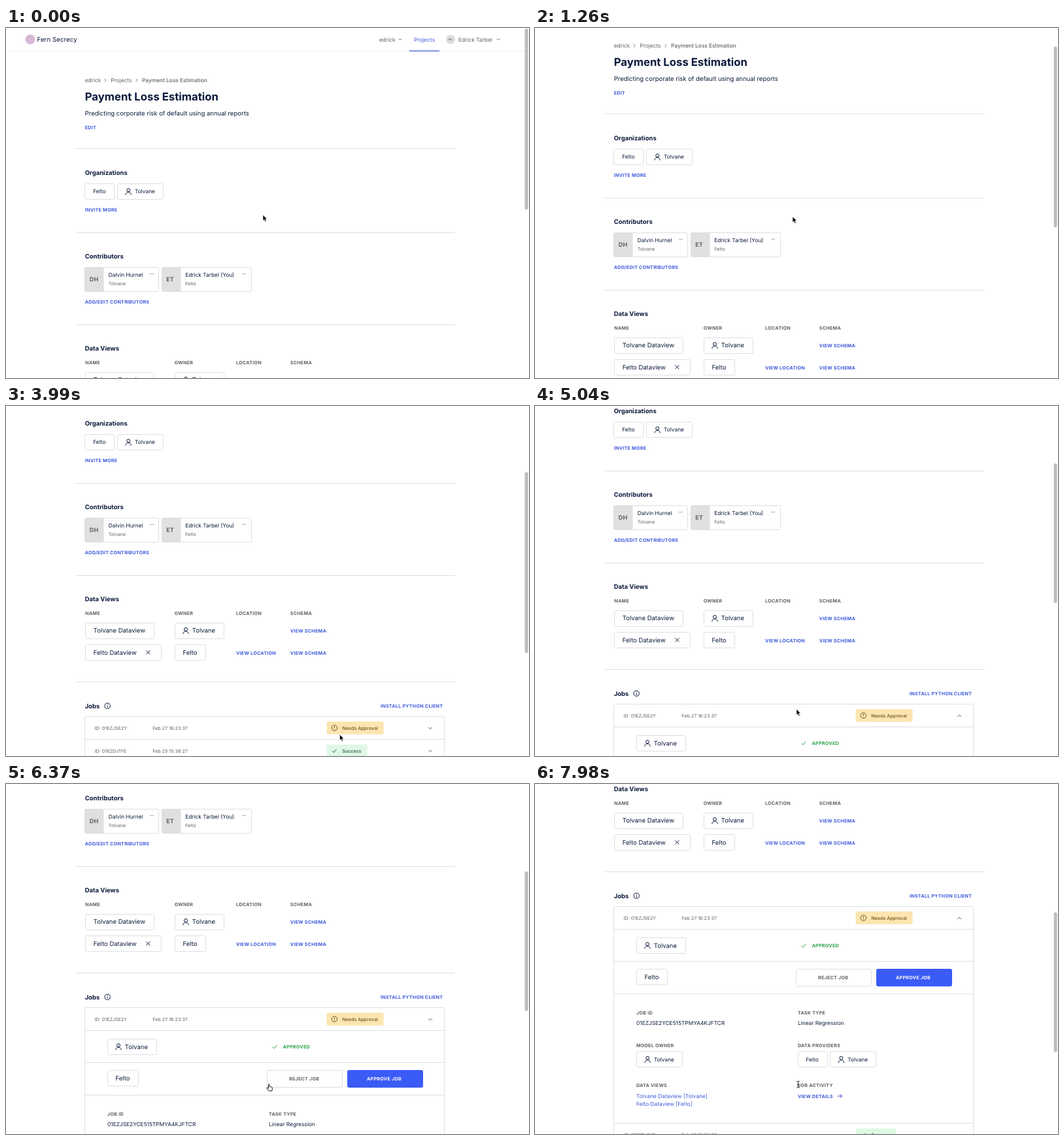
Write an HTML page that moves like this. It is 800 px wide and 536 px high and loops after 8 s.

```html
<!DOCTYPE html>
<html lang="en">
<head>
<meta charset="utf-8">
<title>Project page</title>
<style>
  html, body { margin: 0; width: 100%; height: 100%; overflow: hidden; background: #fff; }
  svg { display: block; width: 800px; height: 536px; font-family: Inter, sans-serif; text-rendering: geometricPrecision; }
</style>
</head>
<body>
<svg id="stage" viewBox="0 0 800 536"></svg>
<script>
const NAVY = '#0b1a3c', GRAY = '#5d6168', BLUE = '#3f5bdc', BUTTON = '#3b5bf6',
      GREEN = '#2aa24a', LINE = '#dedfe3', AMBER = '#6f551c';
const SMALL = 7.15, BODY = 8.35, LARGE = 9.5;
const ORG_A = 'Felto', ORG_B = 'Tolvane';

// ---- drawing helpers; y is the optical middle of a line of text ----
const text = (x, y, str, size = BODY, fill = NAVY, weight = 400, spacing = 0) =>
  `<text x="${x}" y="${y + size * 0.36}" font-size="${size}" fill="${fill}" font-weight="${weight}" letter-spacing="${spacing}">${str}</text>`;
const caps = (x, y, str, fill = BLUE) => text(x, y, str, SMALL, fill, 700, 0.26);
const heading = (y, str) => text(120.7, y, str, LARGE, NAVY, 700);
// Outlines sit on pixel centres so that they stay one pixel wide.
const snap = v => Math.floor(v) + 0.5;
const rect = (x, y, w, h, fill = '#fff', stroke = LINE, r = 2) =>
  `<rect x="${snap(x)}" y="${snap(y)}" width="${Math.round(w)}" height="${Math.round(h)}" rx="${r}" fill="${fill}" stroke="${stroke}"/>`;
const stroke = (d, color = NAVY, width = 1) =>
  `<path d="${d}" fill="none" stroke="${color}" stroke-width="${width}" stroke-linecap="round" stroke-linejoin="round"/>`;
const rule = (x1, x2, y, color = LINE) => `<path d="M${x1} ${snap(y)}H${x2}" stroke="${color}"/>`;
const circle = (x, y, r, fill, line = 'none') =>
  `<circle cx="${x}" cy="${y}" r="${r}" fill="${fill}" stroke="${line}"/>`;
const chevron = (x, y, dir, size = 2.5) =>
  stroke(`M${x - size} ${y - dir * size / 2}l${size} ${dir * size}l${size} ${-dir * size}`, GRAY);
const crumbArrow = x => stroke(`M${x - 1} 78l2 2.2l-2 2.2`, GRAY, 0.8);
const check = (x, y, color) => stroke(`M${x - 3} ${y}l2 2.2l4 -4.6`, color);
const person = (x, y) =>
  circle(x, y - 2, 2.5, 'none', NAVY) + stroke(`M${x - 4.2} ${y + 4.8}c.3-5.2 8.1-5.2 8.4 0`);

function pill(x, y, w, label, size, withPerson) {
  return rect(x, y - 12, w, 24) + (withPerson ? person(x + 17, y) : '') +
    text(x + (withPerson ? 26.8 : 12.5), y, label, size);
}
function card(x, w, initials, name, org) {
  return rect(x, 366, w, 37) + `<path d="M${Math.floor(x) + 1} 367h28.5v36h-28.5z" fill="#e0e0e0"/>` +
    text(x + 7, 385, initials, 9, GRAY, 700, 0.2) + text(x + 36, 378, name) +
    text(x + 36, 391, org, SMALL, GRAY) +
    [-2, 0, 2].map(d => circle(x + w - 10.5 + d, 376.3, 0.6, GRAY)).join('');
}
function jobRow(y, id, date) {
  return text(135.7, y, 'ID: ' + id, SMALL, GRAY) + text(224.3, y, date, SMALL, GRAY);
}
function badge(y, w, label, fill, color) {
  return `<rect x="490.5" y="${y - 10}" width="${w}" height="19.5" rx="2" fill="${fill}"/>` +
    text(514.2, y, label, SMALL, color, 450);
}

// ---- page ----
const header =
  circle(37, 17.5, 7.5, '#d9b9d8') + text(47.5, 17.5, 'Fern Secrecy', 9.8, NAVY) +
  text(571, 17.5, 'edrick', BODY, GRAY) + chevron(603, 17.5, 1, 1.8) +
  text(624, 17.5, 'Projects', BODY, BLUE) +
  circle(680, 17.5, 7, '#dcdcdc') + text(677.2, 17.5, 'ET', 4, GRAY, 700) +
  text(692, 17.5, 'Edrick Tarbel', BODY, GRAY) + chevron(753, 17.5, 1, 1.8) +
  rule(0, 793, 35, '#eeeef0') + `<path d="M617 34.5h46v1.3h-46z" fill="${BLUE}"/>`;

const intro =
  text(120.7, 80, 'edrick', BODY, GRAY) + crumbArrow(152) +
  text(160.3, 80, 'Projects', BODY, GRAY) + crumbArrow(200) +
  text(208, 80, 'Payment Loss Estimation', BODY, GRAY, 500) +
  text(120.7, 104.7, 'Payment Loss Estimation', 16.7, NAVY, 700) +
  text(120.7, 131, 'Predicting corporate risk of default using annual reports', LARGE) +
  caps(120.7, 152, 'EDIT');

const people =
  heading(221.5, 'Organizations') + pill(120.7, 250.3, 45, ORG_A, BODY) +
  pill(170.2, 250.3, 70.3, ORG_B, BODY, true) + caps(120.7, 278.4, 'INVITE MORE') +
  heading(349.7, 'Contributors') +
  card(120.7, 112.8, 'DH', 'Dalvin Hurnel', ORG_B) +
  card(238.2, 136.6, 'ET', 'Edrick Tarbel (You)', ORG_A) +
  caps(120.7, 419.5, 'ADD/EDIT CONTRIBUTORS');

const dataViews =
  heading(490.7, 'Data Views') +
  [[121.2, 'NAME'], [257.7, 'OWNER'], [352, 'LOCATION'], [434.8, 'SCHEMA']]
    .map(([x, s]) => caps(x, 512.4, s, GRAY)).join('') +
  pill(121.3, 539, 104.5, ORG_B + ' Dataview', LARGE) + pill(258, 539, 74.7, ORG_B, LARGE, true) +
  caps(434.8, 539.7, 'VIEW SCHEMA') +
  pill(121.3, 572.4, 116.3, ORG_A + ' Dataview', LARGE) +
  stroke('M214.8 569.6l5.4 5.4m0-5.4l-5.4 5.4') + pill(258, 572.4, 46.7, ORG_A, LARGE) +
  caps(352, 573.2, 'VIEW LOCATION') + caps(434.8, 573.2, 'VIEW SCHEMA');

const jobs =
  heading(654.4, 'Jobs') + circle(155.2, 654.2, 4.1, 'none', NAVY) +
  stroke('M155.2 654v2.2m0-4.2v.1') + caps(573, 654.2, 'INSTALL PYTHON CLIENT') +
  rect(120.9, 670.9, 550.3, 520) + jobRow(688.5, '01EZJSE2Y', 'Feb 27 16:23:37') +
  badge(688.3, 87, 'Needs Approval', '#fce5b0', AMBER) +
  circle(502.4, 688, 4.2, 'none', AMBER) + stroke('M502.4 686v2m0 2v.1', AMBER) +
  rule(121, 671, 705.8);

const details =
  pill(155, 730.2, 74.7, ORG_B, LARGE, true) + check(411, 730.7, GREEN) +
  caps(423.5, 730.7, 'APPROVED', GREEN) + rule(121, 671, 754.2) +
  pill(155, 778.6, 46.7, ORG_A, LARGE) +
  rect(399.7, 766.7, 115.2, 25.8) + caps(433, 779.5, 'REJECT JOB', GRAY) +
  rect(522.3, 766.7, 114.5, 25.8, BUTTON, BUTTON) + caps(552, 779.5, 'APPROVE JOB', '#fff') +
  rule(121, 671, 804.4) +
  caps(155, 833.3, 'JOB ID', GRAY) + text(155, 849.2, '01EZJSE2YCE515TPMYA4KJFTCR') +
  caps(402, 833.3, 'TASK TYPE', GRAY) + text(402, 849.2, 'Linear Regression') +
  caps(155, 883.2, 'MODEL OWNER', GRAY) + pill(155.2, 904.7, 69.5, ORG_B, BODY, true) +
  caps(402, 883.2, 'DATA PROVIDERS', GRAY) + pill(402, 904.7, 45, ORG_A, BODY) +
  pill(451.4, 904.7, 70.3, ORG_B, BODY, true) +
  caps(155, 944.8, 'DATA VIEWS', GRAY) +
  text(155, 960.5, `${ORG_B} Dataview [${ORG_B}]`, BODY, BLUE) +
  text(155, 973, `${ORG_A} Dataview [${ORG_A}]`, BODY, BLUE) +
  caps(402, 944.8, 'JOB ACTIVITY', GRAY) + caps(402, 961.2, 'VIEW DETAILS') +
  stroke('M463 961h6.6m-3-3l3 3l-3 3', BLUE) + rule(121, 671, 1002.8);

const nextJob =
  jobRow(723.7, '01EZDJ1YE', 'Feb 25 15:38:27') +
  badge(723.5, 62, 'Success', '#def8e5', '#2c5a3c') + check(502.3, 723.5, '#2c5a3c') +
  chevron(649, 723.5, 1);

const pointers = {
  arrow: '<path d="M0-.7v9l2-1.9l1.5 3.4l1.6-.7l-1.5-3.3h2.8z" fill="#000" stroke="#fff" stroke-width=".6"/>',
  hand: '<path d="M-.6 0c0-1.3 1.6-1.3 1.6 0v3l3.4.7c1 .3 1.2 1 1 2l-.6 3.8h-4.8l-3.2-4c-.6-1 .7-1.5 1.4-.8l1.2 1z" fill="#fff" stroke="#000" stroke-width=".9"/>',
  beam: stroke('M-1.8-5q1.8 0 1.8 1.2v7.6q0 1.2-1.8 1.2M1.8-5q-1.8 0-1.8 1.2v7.6q0 1.2 1.8 1.2M-1.2.8h2.4', '#111', 0.9)
};

document.getElementById('stage').innerHTML =
  `<g id="page">${header}${[184.5, 313.5, 454.5, 617.8].map(y => rule(107, 686.5, y)).join('')}
   ${intro}${people}${dataViews}${jobs}
   <g id="details">${details}</g><g id="nextJob">${nextJob}</g>
   <g id="closedMark">${chevron(649, 688.5, 1)}</g><g id="openMark">${chevron(649, 688.5, -1)}</g></g>
   <rect id="thumb" x="793.6" width="5" rx="2.5" fill="#bdbdbd"/>
   <g id="pointer">${Object.entries(pointers).map(([k, v]) => `<g id="${k}">${v}</g>`).join('')}</g>`;

// ---- motion ----
const DURATION = 8000, STEP = 70, OPEN_AT = 4200;
const scrollKeys = [[910, 0], [1260, 52.7], [1750, 194], [1890, 195.4], [4600, 195.4], [4900, 214.4],
  [5040, 214.4], [5400, 322], [5530, 327.7], [6440, 327.7], [6720, 427], [7280, 481.5], [7420, 482.6]];
const pointerKeys = [[910, 393, 287], [1260, 394, 289.5], [1890, 394, 290], [2590, 494, 333],
  [3400, 518, 490], [3780, 510, 503], [4200, 511, 504], [4800, 400, 465], [5040, 400, 465],
  [5530, 401.5, 461], [7980, 402.5, 460]];

// Monotone cubic through keys [time, values...], reading value column c.
function track(keys, t, c = 1) {
  const last = keys.length - 1;
  if (t <= keys[0][0]) return keys[0][c];
  if (t >= keys[last][0]) return keys[last][c];
  const i = keys.findIndex(k => k[0] > t) - 1;
  const slope = j => j < 0 || j >= last ? 0 : (keys[j + 1][c] - keys[j][c]) / (keys[j + 1][0] - keys[j][0]);
  const tangent = j => {
    const a = slope(j - 1), b = slope(j);
    return a * b > 0 ? 2 * a * b / (a + b) : 0;
  };
  const h = keys[i + 1][0] - keys[i][0], u = (t - keys[i][0]) / h, v = 1 - u;
  return keys[i][c] * (1 + 2 * u) * v * v + keys[i + 1][c] * u * u * (3 - 2 * u) +
    h * u * v * (tangent(i) * v - tangent(i + 1) * u);
}

const el = id => document.getElementById(id);
const show = (id, on) => el(id).setAttribute('display', on ? 'inline' : 'none');
const move = (id, x, y) => el(id).setAttribute('transform', `translate(${x} ${y})`);

function draw() {
  const t = Math.floor(performance.now() % DURATION / STEP) * STEP;
  const scroll = Math.round(track(scrollKeys, t)), open = t >= OPEN_AT;
  move('page', 0, -scroll);
  move('nextJob', 0, open ? 297 : 0);
  show('details', open);
  show('openMark', open);
  show('closedMark', !open);
  el('thumb').setAttribute('y', 1 + scroll * (open ? 0.405 : 0.514));
  el('thumb').setAttribute('height', open ? 214 : 277);

  const kind = t < 5670 ? 'arrow' : t < 7420 ? 'hand' : 'beam';
  Object.keys(pointers).forEach(k => show(k, k === kind));
  move('pointer', track(pointerKeys, t, 1), track(pointerKeys, t, 2));
  requestAnimationFrame(draw);
}
draw();
</script>
</body>
</html>
```
